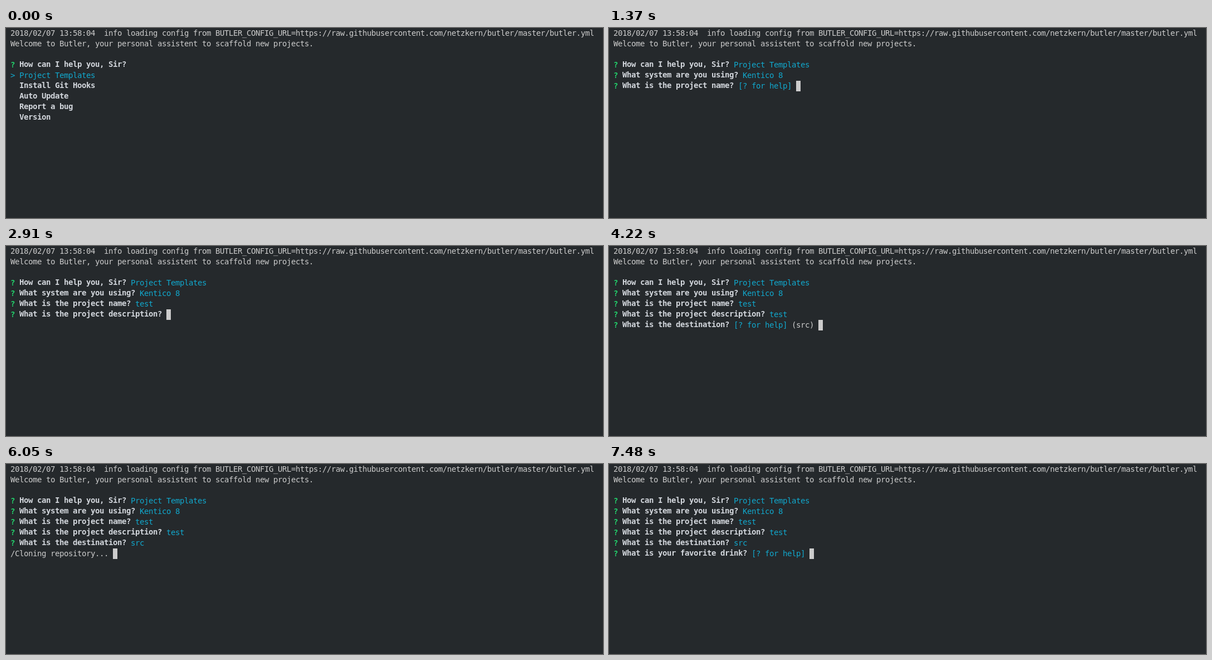
These frames come from a looping animation (1072 px wide and 342 px high, 8000 ms). An HTML page with a canvas:

```html
<!DOCTYPE html>
<html lang="en">
<head>
<meta charset="utf-8">
<title>Butler</title>
<style>
  html, body { margin: 0; width: 100%; height: 100%; overflow: hidden; background: #25292c; }
  canvas { display: block; }
</style>
</head>
<body>
<canvas id="terminal" width="1072" height="342"></canvas>
<script>
const ctx = document.getElementById("terminal").getContext("2d");
const LOOP = 8000, LEFT = 8, CELL_W = 8, CELL_H = 19;

// Bold default text sits one pixel higher than the rest.
const style = (color, weight = "", baseline = 14) =>
  ({ color, baseline, font: `${weight} 14px "DejaVu Sans Mono", monospace` });
const plain = style("#cccccc");
const bold = style("#d3d7dd", "bold", 13);
const cyan = style("#11a8cd");
const green = style("#23d16b", "bold");

const HELP = "[? for help] ";
const SPINNER = "|/-\\";
const SPIN_TIMES = [5150, 5230, 5380, 5460, 5600, 5680, 5760, 5920, 5990, 6050, 6210, 6290,
  6370, 6440, 6590, 6650, 6800, 6880, 6950, 7030, 7170, 7250, 7410];

const HEADER = [
  [[plain, "2018/02/07 13:58:04  info loading config from BUTLER_CONFIG_URL=https://raw.githubusercontent.com/netzkern/butler/master/butler.yml"]],
  [[plain, "Welcome to Butler, your personal assistent to scaffold new projects."]],
  []
];

const ask = (question, answer = "", typed = "") =>
  [[green, "? "], [bold, question + " "], [cyan, answer], [plain, typed]];

const menu = (question, [selected, ...others]) =>
  [ask(question), [[cyan, "> " + selected]], ...others.map(item => [[bold, "  " + item]])];

// Text entered so far: two letters, then the whole word.
const typedTest = (t, first, second, last) =>
  "test".slice(0, t >= last ? 4 : t >= second ? 2 : t >= first ? 1 : 0);

function screenAt(t) {
  const lines = [...HEADER];
  const show = (...added) => lines.push(...added);
  const result = cursor => ({ lines, cursor });

  const help = "How can I help you, Sir?";
  if (t < 510) {
    show(...menu(help, ["Project Templates", "Install Git Hooks", "Auto Update", "Report a bug", "Version"]));
    return result(false);
  }
  show(ask(help, "Project Templates"));

  const system = "What system are you using?";
  if (t < 1370) {
    show(...menu(system, ["Kentico 8", "Kentico 9"]));
    return result(false);
  }
  show(ask(system, "Kentico 8"));

  const name = "What is the project name?";
  if (t < 2910) {
    show(ask(name, HELP, typedTest(t, 2140, 2220, 2450)));
    return result(true);
  }
  show(ask(name, "test"));

  const description = "What is the project description?";
  if (t < 4220) {
    show(ask(description, "", typedTest(t, 3530, 3530, 3760)));
    return result(true);
  }
  show(ask(description, "test"));

  const destination = "What is the destination?";
  if (t < 5150) {
    show(ask(destination, HELP, "(src) "));
    return result(true);
  }
  show(ask(destination, "src"));

  if (t < 7480) {
    const turn = SPIN_TIMES.filter(time => time <= t).length - 1;
    show([[plain, SPINNER[turn % 4] + "Cloning repository... "]]);
  } else {
    show(ask("What is your favorite drink?", HELP));
  }
  return result(true);
}

function draw(t) {
  const { lines, cursor } = screenAt(t);
  ctx.fillStyle = "#25292c";
  ctx.fillRect(0, 0, 1072, 342);
  let x = LEFT;
  lines.forEach((line, row) => {
    x = LEFT;
    for (const [look, text] of line) {
      ctx.font = look.font;
      ctx.fillStyle = look.color;
      for (const char of text) {
        ctx.fillText(char, x, row * CELL_H + look.baseline);
        x += CELL_W;
      }
    }
  });
  if (cursor) {
    ctx.fillStyle = "#cccccc";
    ctx.fillRect(x, (lines.length - 1) * CELL_H, CELL_W, CELL_H);
  }
}

const start = performance.now();
function frame() {
  draw((performance.now() - start) % LOOP);
  requestAnimationFrame(frame);
}
frame();
</script>
</body>
</html>
```
